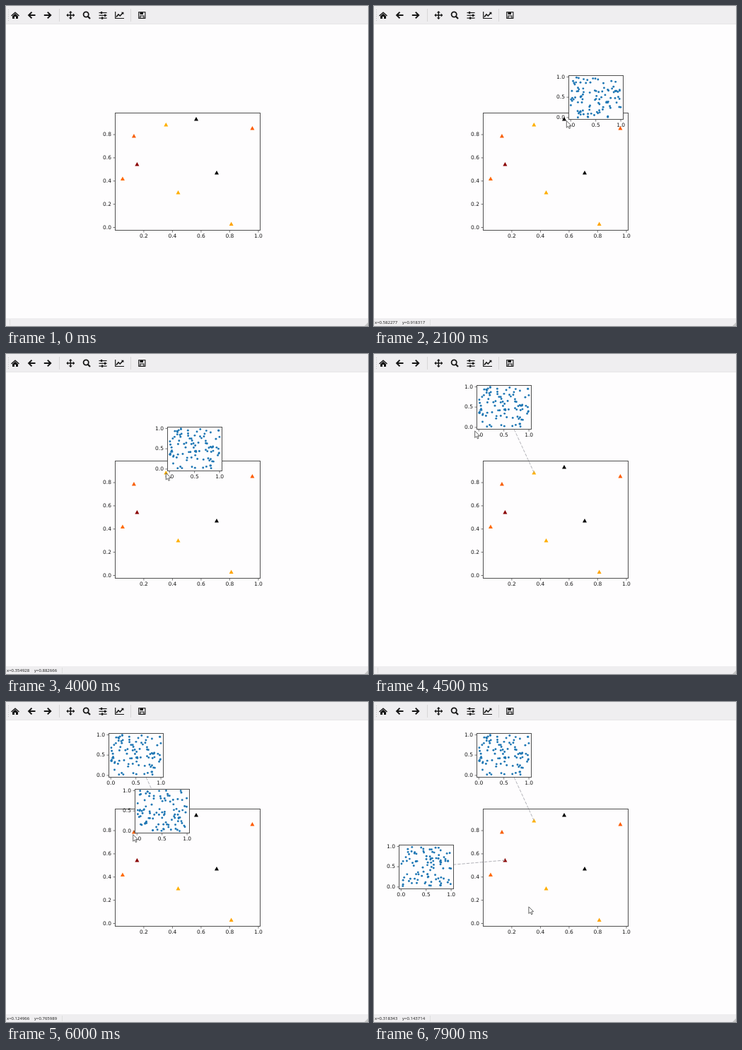
An HTML page with a canvas that plays this animation: 512x453 px, repeating every 8000 ms.

```html
<!DOCTYPE html>
<html>
<head>
<meta charset="utf-8">
<style>
html, body { margin: 0; width: 100%; height: 100%; overflow: hidden; background: #fefdfe; }
canvas { display: block; }
</style>
</head>
<body>
<canvas id="stage" width="512" height="453"></canvas>
<script>
const g = document.getElementById('stage').getContext('2d');
const LOOP = 8000, STEP = 100, LAG = 16, REACH = 6.5;
const PAPER = '#fefdfe', BAR = '#efeef0', INK = '#161616', SPINE = '#505050';

// Data coordinates of the main axes to pixels.
const px = v => 154.4 + 202.5 * v;
const py = v => 313.5 - 164.3 * v;

// Triangle markers: x, y, colour.
const markers = [
  [.052, .42, '#ff6a00'], [.131, .788, '#f8600c'], [.153, .545, '#8a0000'],
  [.355, .886, '#ffb000'], [.44, .301, '#ffae00'], [.566, .934, '#000'],
  [.709, .472, '#000'], [.811, .03, '#ffa50a'], [.958, .855, '#ff5c00']
];

// Pointer stops: arrival and departure times, x, y.
const stops = [
  [300, 400, .818, 1.774], [1100, 1500, .961, .849], [2080, 2250, .582277, .918317],
  [3250, 4050, .354928, .882666], [4470, 4600, -.058, 1.245],
  [5100, 6100, .124966, .765989], [6400, 6700, .15, .533], [6900, 6900, -.353, .41],
  [7200, 7500, -.599, .283], [7880, 8000, .318343, .143714]
];

// Hover plots dragged out and left in place: marker, press, release.
const drags = [[3, 4050, 4600], [2, 6700, 7300]];

const clouds = markers.map((_, i) => {
  let seed = 4241 + 7919 * i;
  const rand = () => (seed = seed * 16807 % 2147483647) / 2147483647;
  return Array.from({ length: 100 }, () => [rand(), rand()]);
});

function pointer(t) {
  const i = stops.findIndex(s => t <= s[1]);
  const [arrive, , x, y] = stops[i];
  if (i === 0 || t >= arrive) return [x, y];
  const [, leave, x0, y0] = stops[i - 1];
  const f = (t - leave) / (arrive - leave);
  return [x0 + (x - x0) * f, y0 + (y - y0) * f];
}

function rect(x, y, w, h, color) {
  g.fillStyle = color;
  g.fillRect(x, y, w, h);
}

function trace(pts) {
  g.beginPath();
  pts.forEach(p => g.lineTo(...p));
}

function line(pts, width = 1, color = INK) {
  trace(pts);
  g.lineWidth = width;
  g.strokeStyle = color;
  g.stroke();
}

function poly(pts, color = INK) {
  trace(pts);
  g.fillStyle = color;
  g.fill();
}

function circle(x, y, r) {
  g.beginPath();
  g.arc(x, y, r, 0, 7);
}

function label(text, x, y, align) {
  g.textAlign = align;
  g.fillStyle = INK;
  g.fillText(text, x, y);
}

function axes(x, y, w, h, xs, ys, toX, toY) {
  const bottom = y + h;
  rect(x, y, w, h, PAPER);
  g.lineWidth = 1;
  g.strokeStyle = SPINE;
  g.strokeRect(x, y, w, h);
  g.font = '7.5px "DejaVu Sans", sans-serif';
  g.textBaseline = 'middle';
  for (const v of xs) {
    line([[toX(v), bottom], [toX(v), bottom + 3]], .8, SPINE);
    label(v.toFixed(1), toX(v), bottom + 8.7, 'center');
  }
  for (const v of ys) {
    line([[x - 3, toY(v)], [x, toY(v)]], .8, SPINE);
    label(v.toFixed(1), x - 5.5, toY(v) + .3, 'right');
  }
}

function mainPlot() {
  const fifths = [0, .2, .4, .6, .8, 1];
  axes(154.5, 151.5, 205, 166, fifths.slice(1), fifths.slice(0, 5), px, py);
  for (const [vx, vy, color] of markers) {
    const x = px(vx), y = py(vy);
    poly([[x, y - 3], [x + 3, y + 2.5], [x - 3, y + 2.5]], color);
  }
}

function insetPlot(m, [vx, vy], tethered) {
  const w = 77, h = 62;
  const x = Math.round(px(vx) + 2.2) + .5, y = Math.round(py(vy) - 3) + .5 - h;
  const toX = v => x + 2.8 + 70.8 * v, toY = v => y + h - 2.6 - 57.5 * v;
  if (tethered) {
    g.setLineDash([4.4, 1.9]);
    line([[px(markers[m][0]), py(markers[m][1])], [x + w / 2, y + h / 2]], 1, '#b2b2b8');
    g.setLineDash([]);
  }
  axes(x, y, w, h, [0, .5, 1], [0, .5, 1], toX, toY);
  g.fillStyle = '#1f77b4';
  for (const [u, v] of clouds[m]) {
    circle(toX(u), toY(v), 1.45);
    g.fill();
  }
}

function insets(t) {
  const at = pointer(t - LAG);
  const held = drags.filter(d => t > d[1]);
  for (const [m, , release] of held) insetPlot(m, pointer(Math.min(t - LAG, release)), true);
  if (t < stops[0][0] || held.some(d => t <= d[2])) return;
  markers.forEach(([x, y], m) => {
    const gap = Math.hypot(px(x) - px(at[0]), py(y) - py(at[1]));
    if (gap < REACH && !held.some(d => d[0] === m)) insetPlot(m, at, false);
  });
}

function arrow(x, dir) {
  line([[x - 5 * dir, 13], [x + 4 * dir, 13]], 2);
  line([[x, 8.6], [x + 4.4 * dir, 13], [x, 17.4]], 2);
}

function toolbar() {
  rect(0, 0, 512, 25, BAR);
  rect(0, 25, 512, 1, '#e6e5e7');
  for (const x of [75, 176]) rect(x, 4, 1, 18, '#d8d7d8');
  for (let y = 5; y < 22; y += 3) rect(3, y, 1, 1, '#c4c4c4');
  // home
  line([[7.5, 14], [13, 9.2], [18.5, 14]], 1.4);
  poly([[9, 14.2], [13, 10.8], [17, 14.2], [17, 18], [9, 18]]);
  rect(12, 15, 2, 3, BAR);
  arrow(36.5, -1);
  arrow(58.8, 1);
  // pan
  for (let k = 0; k < 4; k++) {
    g.save();
    g.translate(91.3, 13);
    g.rotate(k * Math.PI / 2);
    line([[0, 0], [5, 0]], 1.5);
    poly([[6, 0], [3.5, -2.5], [3.5, 2.5]]);
    g.restore();
  }
  // zoom
  circle(113.2, 12, 3.6);
  g.lineWidth = 1.8;
  g.stroke();
  line([[115.8, 14.8], [119, 18]], 2.2);
  // sliders
  [134, 139, 135].forEach((x, i) => {
    const y = 9.5 + 3.8 * i;
    line([[131.5, y], [142.6, y]], 1.2);
    rect(x, y - 1.6, 2.2, 3.2, INK);
  });
  // chart
  line([[154.7, 8], [154.7, 17.5], [167, 17.5]], 1.2);
  line([[156, 15.5], [159, 12], [161.3, 14], [165, 10]], 1.6);
  poly([[162.8, 8.7], [166.4, 8.7], [166.4, 12.3]]);
  // save
  g.lineWidth = 1.1;
  g.strokeRect(187.7, 8.7, 9.2, 8.7);
  g.strokeRect(189.7, 14, 5.2, 3.4);
  rect(189.4, 9, 4.6, 3, INK);
}

function statusBar(x, y) {
  const inside = x > 0 && x < 1.012 && y > -.024 && y < .989;
  rect(0, 442, 512, 11, BAR);
  rect(inside ? 79 : 5, 444, 1, 8, '#dfdfdf');
  poly([[512, 448], [512, 453], [507, 453]], '#c6c6c6');
  if (!inside) return;
  g.font = '6px "Open Sans", sans-serif';
  g.textBaseline = 'alphabetic';
  label('x=' + x.toFixed(6), 1, 450, 'left');
  label('y=' + y.toFixed(6), 40, 450, 'left');
}

function cursor(x, y) {
  g.save();
  g.translate(x, y);
  trace([[0, 0], [0, 9.6], [2.2, 7.6], [3.8, 11], [5.3, 10.2], [3.8, 7], [6.8, 6.8]]);
  g.closePath();
  g.fillStyle = '#fff';
  g.fill();
  g.lineWidth = .9;
  g.strokeStyle = '#555';
  g.stroke();
  g.restore();
}

function draw(t) {
  rect(0, 0, 512, 453, PAPER);
  mainPlot();
  insets(t);
  toolbar();
  statusBar(...pointer(t - LAG));
  const [x, y] = pointer(t);
  if (t >= stops[0][0]) cursor(px(x), py(y));
}

function tick() {
  draw(Math.floor(performance.now() % LOOP / STEP) * STEP);
  requestAnimationFrame(tick);
}
tick();
</script>
</body>
</html>
```
